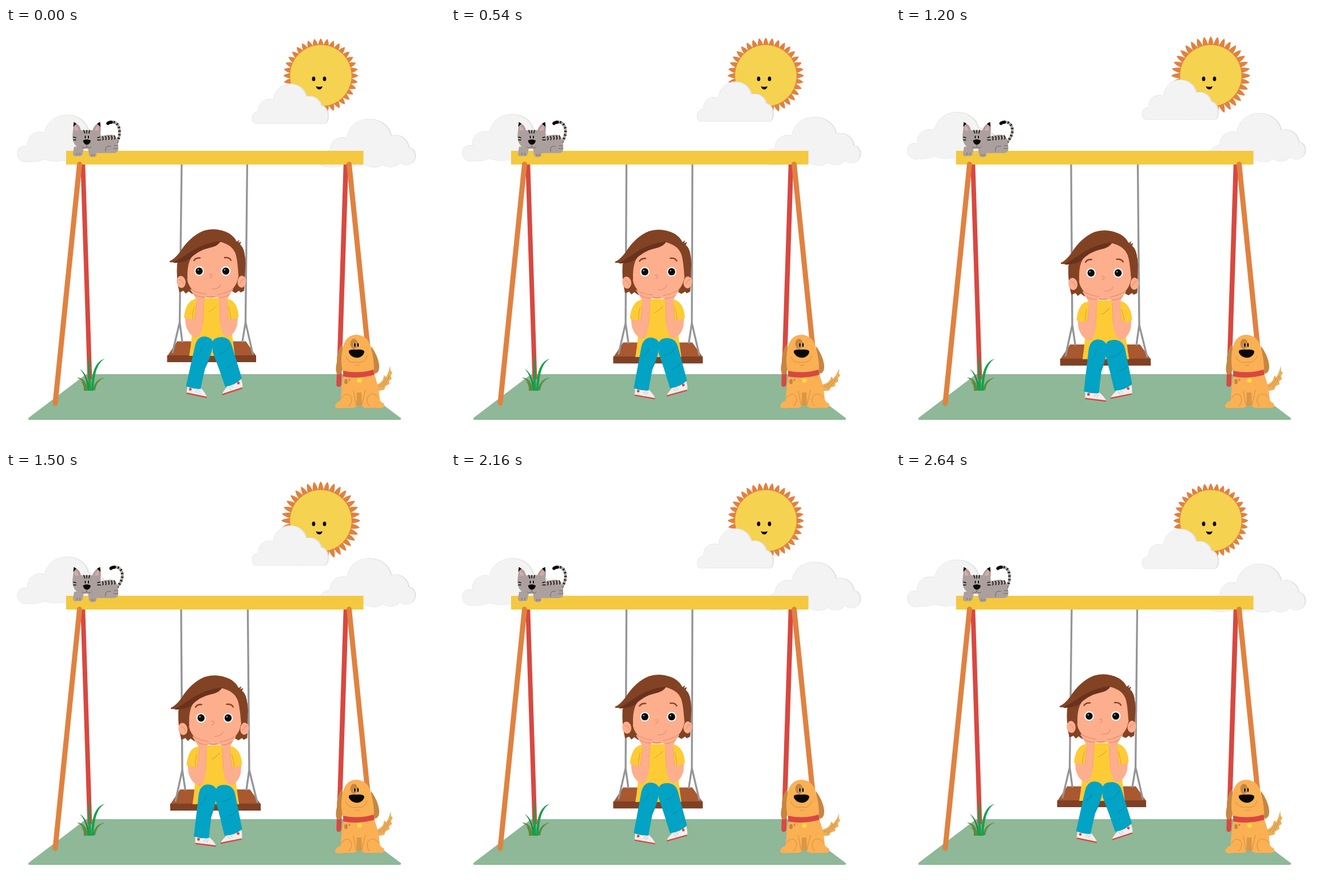
An HTML page with a canvas for the animation above (2700 ms loop, 767 px wide and 730 px high).

```html
<!DOCTYPE html>
<html lang="en">
<head>
<meta charset="utf-8">
<title>Swing</title>
<style>
html, body { margin: 0; width: 100%; height: 100%; overflow: hidden; background: #fff; }
canvas { display: block; }
</style>
</head>
<body>
<canvas id="stage" width="767" height="730"></canvas>
<script>
const ctx = document.getElementById('stage').getContext('2d');
const LOOP = 2700, STEP = 60;
const RED = '#d84840', ORANGE = '#e08240', YELLOW = '#f4c93f', SKIN = '#fdae8d',
      SKIN_LINE = '#e58c6c', HAIR = '#824324', TEAL = '#02a3c4', GREY = '#aba09d',
      FUR = '#fbb054', FUR_DARK = '#c68641', INK = '#0b0808', ROPE = '#949597';

const cache = {};
const shape = d => cache[d] || (cache[d] = new Path2D(d));

function fill(d, color) {
  ctx.fillStyle = color;
  ctx.fill(shape(d));
}

function line(d, color, width, cap = 'round') {
  ctx.strokeStyle = color;
  ctx.lineWidth = width;
  ctx.lineCap = cap;
  ctx.lineJoin = 'round';
  ctx.stroke(shape(d));
}

function oval(x, y, rx, ry, color, turn = 0) {
  ctx.fillStyle = color;
  ctx.beginPath();
  ctx.ellipse(x, y, rx, ry, turn, 0, Math.PI * 2);
  ctx.fill();
}

function group(draw) {
  ctx.save();
  draw();
  ctx.restore();
}

function turned(x, y, degrees, draw) {
  group(() => {
    ctx.translate(x, y);
    ctx.rotate(degrees * Math.PI / 180);
    ctx.translate(-x, -y);
    draw();
  });
}

// 0..1..0 wave that reaches 1 at the peak time
const wave = (t, peak, period) => (1 + Math.cos((t - peak) / period * 2 * Math.PI)) / 2;

function ground() {
  fill('M140 606 H588 L690 683 Q691 686 687 686 H41 Q37 685 40 682Z', '#8eb897');
}

function sun(pulse) {
  group(() => {
    ctx.translate(550, 83.5);
    const rays = 36, tip = 65.5 + 3.7 * pulse;
    for (let i = 0; i < rays; i++) {
      group(() => {
        ctx.rotate(i / rays * 2 * Math.PI);
        ctx.fillStyle = ORANGE;
        ctx.beginPath();
        ctx.moveTo(-5, -51);
        ctx.quadraticCurveTo(-4.2, -tip + 5, 0, -tip);
        ctx.quadraticCurveTo(4.2, -tip + 5, 5, -51);
        ctx.fill();
      });
    }
    oval(0, 0, 54.5, 54.5, ORANGE);
    oval(0, 0, 53.7, 53.7, '#f5d24f');
  });
  oval(537.5, 89, 2.9, 4, INK);
  oval(556.5, 89, 2.9, 4, INK);
  fill('M541.500 102 Q547 104 553 102 Q551.500 107.500 547.500 107.500 Q543 107.500 541.500 102Z', INK);
}

function cloud(d, lift) {
  group(() => {
    ctx.translate(0, -lift);
    fill(d, '#e1e1e1');
    ctx.clip(shape(d));
    ctx.translate(-4, 2.5);
    fill(d, '#f3f3f3');
    ctx.translate(2, -2);
    fill(d, '#f3f3f3');
    ctx.translate(2, -.5);
    line(d, '#e1e1e1', 1);
  });
}

const CLOUDS = {
  left: 'M40 234 C25 238 16 224 21 213 C25 206 32 206 37 207 C36 190 50 178 67 183 C73 161 89 152 107 152 C125 152 141 162 145 179 C170 181 188 205 182 228 C160 239 150 230 138 232 C125 238 110 236 100 232 C85 236 75 232 67 230 C58 234 50 235 40 234Z',
  right: 'M562 243 C547 244 543 232 551 222 C557 216 562 214 566 214 C566 197 581 188 595 192 C600 170 615 159 635 159 C655 159 671 171 674 188 C691 184 704 196 705 209 C717 210 721 230 709 237 C701 242 693 240 688 236 C680 246 666 245 659 239 C650 246 637 246 625 239 C610 244 595 240 588 239 C580 244 572 244 562 243Z',
  sunny: 'M436 168 C427 165 427 147 441 146 C440 130 454 122 467 126 C470 107 483 98 497 98 C512 98 523 107 526 120 C538 117 550 125 552 136 C564 138 568 158 560 167 Q559 168 555 168Z'
};

function frame() {
  line('M134.300 238 L146.300 612', RED, 8);
  line('M594 238 L581.500 624', RED, 8.5);
  fill('M105 215 H624.500 V239 H105Z', YELLOW);
  line('M128.500 238.500 L86 657', ORANGE, 9);
  line('M599.500 238.500 L642 657', ORANGE, 9);
}

function grass() {
  fill('M139 634 Q138 618 124 612 Q140 612 143 634Z', '#5f8a3c');
  fill('M152 634 Q155 614 173 612 Q158 617 156 634Z', '#5f8a3c');
  fill('M136 635 Q137 625 131 619 Q142 622 142 635Z', '#5f8a3c');
  fill('M143 635 Q140 608 129 597 Q142 604 147 635Z', '#1c8d45');
  fill('M144 635 Q143 590 147 567 Q147 598 149 635Z', '#14a24b');
  fill('M149 635 Q149 584 173 579 Q154 588 153 635Z', '#14a24b');
}

function cat(sway) {
  const s = 5.5 * sway;
  const tail = `M188 207 C197 198 ${200 + s} 186 ${197.5 + s} 175 C${195 + s} 164 ${184 + s} 162 ${178 + s} 167`;
  line(tail, GREY, 4.6);
  group(() => {
    ctx.setLineDash([1.8, 4.6]);
    ctx.lineDashOffset = -22;
    line(tail, INK, 4.6, 'butt');
  });
  line(`M${184 + s} 165 Q${180 + s} 165 ${178 + s} 167`, INK, 5.5);

  fill('M158 193 Q178 184 189 188 Q196 193 196 207 Q198 219 188 219 H150Z', GREY);
  for (let i = 0; i < 5; i++) {
    line(`M${168.5 + i * 5.2} ${190 - i * .4} q2 4 .5 6`, INK, 1.5);
  }
  line('M189 206 h6 M188 211 h7 M174 216 q-2 -11 9 -9', '#6b625f', 1);

  fill('M119 208 L117 220 Q117 226 125 224 Q134 226 134 219 L137 206 M143 208 L145 222 Q147 228 156 225 Q160 223 157 218 L160 207Z', GREY);
  fill('M117 181 L119 165 Q129 169 131 179 H151 Q155 168 164 165 Q167 173 165 184 Q168 200 159 207 Q141 216 123 207 Q114 199 117 181Z', GREY);
  fill('M120 179 V170 Q126 174 127 180Z M162 179 V170 Q156 174 155 180Z', '#dfa8a7');
  fill('M117.500 173 L118.500 164.500 L123 167.500Z M165 173 L164.500 164.500 L159 167.500Z', INK);
  line('M136 179 l1.500 5 M141 179 v5 M146 179 l-1 5 M118 191 l4 1 M118 196 l4 0 M164 191 l-4 1 M165 196 l-5 0', INK, 1.5);
  oval(138.5, 191, 1.7, 3.5, '#ddd8d6');
  oval(144, 191, 1.7, 3.5, '#ddd8d6');
  oval(138.5, 191, 1.2, 2.9, INK);
  oval(144, 191, 1.2, 2.9, INK);
  fill('M134.500 197 Q141 193 148 197 Q147 204 141 204.500 Q136 204 134.500 197Z', INK);
  line('M141 204 v4 q-5 4 -8 0 M141 208 q5 4 8 0 M124 222 v-3 M129 222 v-3 M150 224 v-3 M154 224 v-3', '#6e6562', 1);
}

function dog(wag) {
  turned(651, 632, 12 * wag, () => {
    fill('M644 626 Q660 621 660 608 L664 611 Q669 603 671 591 L672 600 L675 603 L672 609 L674 614 L669 618 L670 623 L663 627 L661 633 L645 637Z', '#ecae58');
    line('M651 628 Q661 622 664 613 M657 629 Q667 620 669 609', FUR_DARK, .9);
  });
  fill('M590 606 Q585 632 585 652 Q575 656 575 663 Q578 667 590 665 H607 Q611 664 613 661 H621 Q624 666 634 665 H657 Q663 663 660 657 Q654 655 653 650 Q651 625 643 605Z', FUR);
  fill('M613 638 H621 L622 661 H612Z', '#dc9743');
  line('M607 635 L611 659 M628 634 L622 659 M586 648 Q593 637 601 643 Q608 652 599 662 M652 648 Q642 636 634 643 Q627 652 635 662', FUR_DARK, .8);

  fill('M588 552 Q577 565 578 585 Q574 602 580 607 Q588 607 590 586Z', FUR_DARK);
  fill('M638 557 Q650 574 652 590 Q653 602 646 605 Q640 605 638 586Z', FUR_DARK);
  fill('M589 603 Q584 587 587 567 Q591 537 612 537 Q633 538 638 561 Q645 590 642 603Z', FUR);
  oval(608, 553, 6.5, 9, FUR_DARK);
  oval(609.5, 555, 2.1, 4.3, '#fbd9a4');
  oval(615.3, 555, 2.1, 4.3, '#fbd9a4');
  oval(609.5, 555, 1.4, 3.7, INK);
  oval(615, 555, 1.4, 3.7, INK);
  fill('M599 565 Q603 562 612 563 Q623 562 626 566 Q626 572 619 576 Q612 579 605 575 Q598 570 599 565Z', INK);
  line('M594 576 Q599 588 613 585 Q626 588 631 574 M610 590 q4 2 7 0', '#d29145', 1);
  fill('M589 600 Q616 606 642 598 L644 607 Q616 615 589 610Z', RED);
  oval(617.5, 617, 4, 4, '#fbdc3c');
  oval(594, 619, 3, 4.5, FUR_DARK);
  oval(600, 616, 1.5, 2, FUR_DARK);
}

function seat() {
  fill('M299 548.500 H419 L437 574 H282Z', '#a9582f');
  fill('M281.500 573 H437 V585 H281.500Z', '#7f4125');
  line('M307 232 L303.500 515 L291 568 M303.500 515 L308 549', ROPE, 3.3);
  line('M421.500 232 L418.500 515 L431 570 M418.500 515 L413 549', ROPE, 3.3);
}

function shoe(body, sole, x, y) {
  fill(body, '#f0eeee');
  line(sole, RED, 2.4);
  oval(x, y, 2.4, 2.4, RED);
}

function legs(p) {
  turned(378, 550, 7 * p, () => {
    shoe('M377 642 Q380 634 391 623 L411 615 Q414 624 413 631Z', 'M378.500 641.500 L412 630.500', 406, 621.500);
    line('M389 629 l5 4 M393 626 l4 4', '#c9c5c5', 1);
    fill('M361 549 Q364 541 378 541 Q390 542 394 554 L412 613 Q402 625 383 628 Q373 598 361 567Z', TEAL);
    line('M371 571 Q384 569 390 556 M387 594 Q396 590 400 583', '#078aa7', 1);
  });
  turned(347, 550, -5 * p, () => {
    shoe('M315.500 639 L317 627 L338 628 Q348 637 351.500 647Z', 'M316.500 639.500 L350 646.500', 322, 632.500);
    line('M331 637 l5 -4 M335 639 l4 -4', '#c9c5c5', 1);
    fill('M330 557 Q334 540 347 540 Q360 541 362 552 Q360 571 348 596 Q343 616 340 632 Q326 632 314.500 627Z', TEAL);
    line('M332 573 Q338 571 343 560 M344 594 Q352 588 356 577', '#078aa7', 1);
  });
}

function torso() {
  fill('M311 507 Q313 485 324 477 Q336 472 345 473 H375 Q390 472 397 479 Q406 488 406.500 506 Q400 511 392 510 Q396 545 400 574 H320 Q326 540 326 510 Q318 511 311 507Z', '#fdcb35');
  line('M326 510 Q326 497 329 488 M393 510 Q392 498 389 488 M354 497 Q363 492 368 486 M334 554 q8 -1 12 -6', '#d9a629', 1);
}

function face() {
  fill('M299 412 Q297 440 303 463 L310 460 L314 465 L319 461 L326 466 L334 456 L326 405Z', HAIR);
  fill('M415 400 Q420 425 416 460 L410 463 L407 460 L401 464 L388 457 L395 405Z', HAIR);
  oval(306, 444.5, 7.8, 10.5, SKIN, -.15);
  oval(412, 444, 7.5, 10.5, SKIN, .15);
  line('M303 440 q6 2 7 8 M416 439 q-6 2 -7 8', SKIN_LINE, 1);
  fill('M316 403 Q312 427 318 446 Q325 464 345 470 Q358 475 373 470 Q395 464 403 446 Q410 428 408 400 Q393 365 365 372Z', SKIN);

  fill('M299 413 Q310 394 330 391 L321 407 Q316 420 317 440 L312 434 Q304 431 299 437Z', HAIR);
  fill('M373 374 Q393 379 399 391 Q404 397 406 433 Q411 430 416 436 Q421 412 416 392 Q408 372 384 367Z', HAIR);
  fill('M286 408 Q294 405 304 392 Q321 365 345 355 Q367 348 389 359 Q399 365 403 374 L408 371 L406 376 L411 374 L409 379 Q418 386 417 407 L411 406 Q403 383 376 374 Q350 378 320 404 Q305 411 286 410Z', HAIR);
  fill('M292 411 Q307 402 316 396 Q344 376 375 373 Q371 382 355 385 Q336 389 320 405 Q308 412 292 411Z', '#6a321d');

  for (const x of [337.5, 384]) {
    oval(x, 425.5, 8.3, 8.4, '#fff');
    oval(x, 425.5, 6.2, 6.3, INK);
    oval(x - 1.8, 423.5, 1, 1, '#fff');
  }
  line('M328.500 407 Q331 402 339 402.500', HAIR, 2.4);
  line('M382 402 Q390 401 393 406.500', HAIR, 2.4);
  line('M355 432 Q360 429 360 434 Q359 437 356 437 M360 457 Q372 458 375 449', SKIN_LINE, 1.1);
  line('M351 470 Q357 472 364 470', '#dd8063', 1.3);
}

function arms() {
  fill('M313 507.500 Q320 510.500 329 509 L333 480 Q333 474 327 466 L322 458 Q326 456 334 460 L349 465 Q352 470 346 476 Q345 500 344 518 Q341 539 332 542 Q319 538 314 520Z', SKIN);
  fill('M405 506.500 Q398 510.500 389 510 L386 482 Q386 474 391 466 L397 458 Q394 455 385 461 L370 466 Q367 470 373 476 Q372 500 374 517 Q377 538 386 541 Q399 538 404 520Z', SKIN);
  line('M323 457 Q333 464 350 466 M329 466 Q337 472 347 471 M396 457 Q386 464 369 467 M391 466 Q383 472 373 472', SKIN_LINE, 1.1);
  line('M330 511 L333 481 M389 511 L386 481 M344 514 L346 477 M374 514 L373 477', '#f0a080', .8);
}

function swing(p) {
  group(() => {
    ctx.translate(364, 238);
    ctx.transform(1 + .018 * p, 0, .0205 * p, 1 + .018 * p, 0, 0);
    ctx.translate(-364, -238);
    seat();
    torso();
    face();
    arms();
    legs(p);
  });
}

function draw(t) {
  const p = wave(t, LOOP / 2, LOOP);
  ctx.fillStyle = '#fff';
  ctx.fillRect(0, 0, 767, 730);
  ground();
  sun(p);
  cloud(CLOUDS.sunny, 7.5 * wave(t, 1150, LOOP));
  cloud(CLOUDS.left, 5.5 * wave(t, 1480, LOOP));
  cloud(CLOUDS.right, 10 * p);
  swing(p);
  frame();
  grass();
  cat(p);
  dog(wave(t, LOOP / 4, LOOP / 2));
}

const start = performance.now();
function tick() {
  const t = (performance.now() - start) % LOOP;
  draw(Math.floor(t / STEP) * STEP);
  requestAnimationFrame(tick);
}
tick();
</script>
</body>
</html>
```
